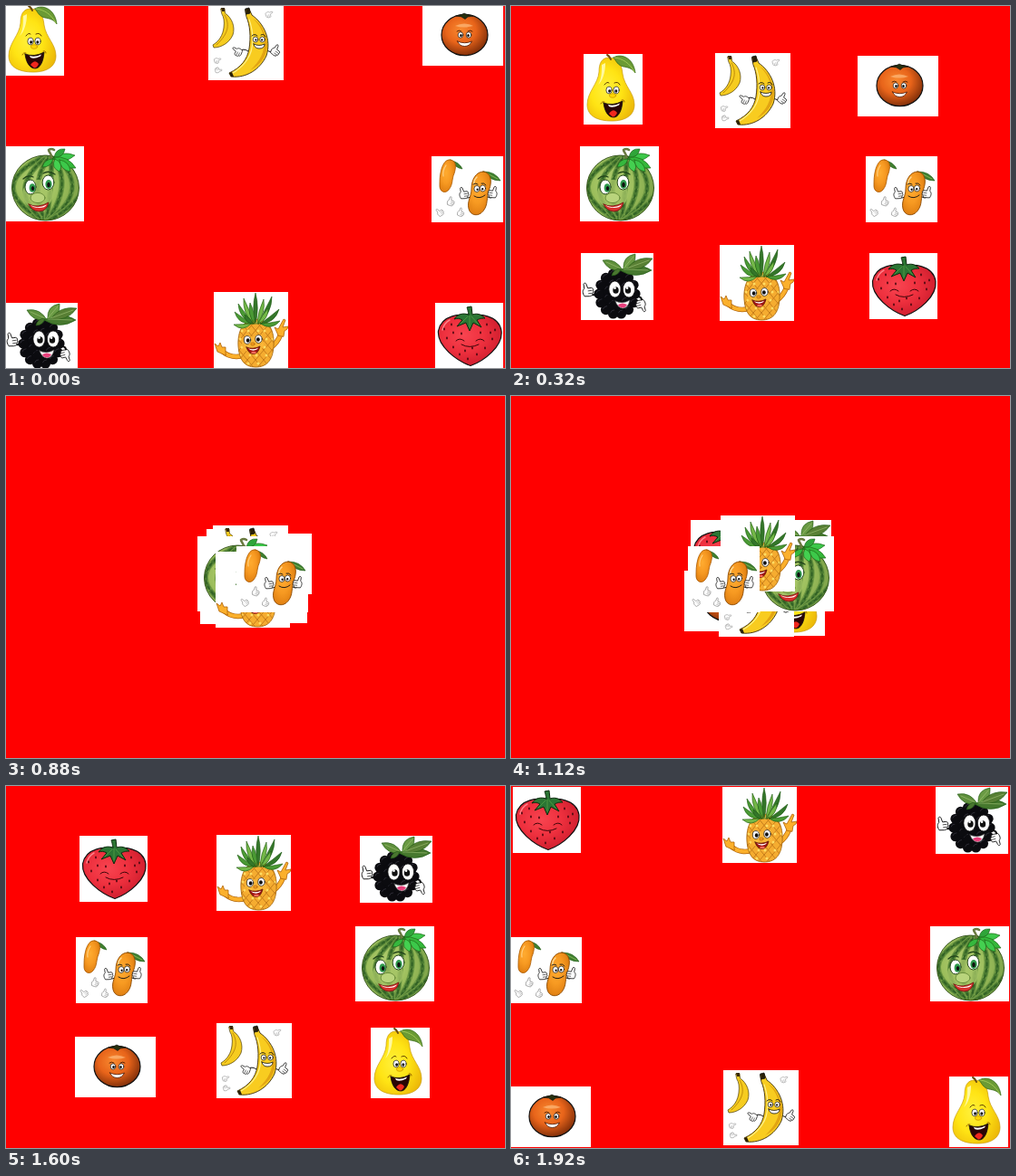
Write an HTML page that moves like this. It is 550 by 400 pixels and loops after 2000 ms.

```html
<!DOCTYPE html>
<html lang="en">
<head>
<meta charset="utf-8">
<title>Fruit cards</title>
<style>
  html, body { margin: 0; width: 100%; height: 100%; overflow: hidden; background: #f00; }
  svg { display: block; position: absolute; left: 0; top: 0; }
</style>
</head>
<body>
<svg id="stage" width="550" height="400" viewBox="0 0 550 400" stroke-linecap="round" stroke-linejoin="round"></svg>
<script>
const INK = '#111';

// Shape helpers, all returning SVG markup
const path = (d, fill = 'none', stroke = 'none', w = 1, more = '') =>
  `<path d="${d}" fill="${fill}" stroke="${stroke}" stroke-width="${w}" ${more}/>`;
const oval = (x, y, rx, ry, fill, stroke = 'none', w = 1, more = '') =>
  `<ellipse cx="${x}" cy="${y}" rx="${rx}" ry="${ry}" fill="${fill}" stroke="${stroke}" stroke-width="${w}" ${more}/>`;
const line = (d, stroke = INK, w = 1) => path(d, 'none', stroke, w);
const range = (n, fn) => Array.from({ length: n }, (_, i) => fn(i)).join('');

// Pointed leaf from base to tip; bend pushes its middle sideways
function leaf(x1, y1, x2, y2, w, fill, bend = 0, stroke = '#1d5a12') {
  const dx = x2 - x1, dy = y2 - y1, len = Math.hypot(dx, dy);
  const side = k => `${x1 + dx / 2 - dy / len * k},${y1 + dy / 2 + dx / len * k}`;
  return path(`M${x1},${y1}Q${side(bend + w)} ${x2},${y2}Q${side(bend - w)} ${x1},${y1}Z`, fill, stroke, .6);
}
const eye = (x, y, rx, ry, px, py, r) =>
  oval(x, y, rx, ry, '#fff', INK, .7) + oval(x + px, y + py, r, r * 1.2, INK);
const glove = (x, y, s = 1, flip = 1, tilt = 0, ink = INK) =>
  `<g transform="translate(${x} ${y}) rotate(${tilt}) scale(${s * flip} ${s})">` +
  path('M-4,6C-6,2 -5,-1 -3,-2L-3,-7C-2,-9 0,-8 0,-6L1,-2L5,-2C7,-1 7,1 6,1C7,2 7,4 5,4C6,6 4,7 2,7Z', '#fff', ink, .9) +
  line('M1,1L5,1M1,4L4,4', ink, .7) + '</g>';
const radial = (id, cx, cy, ...stops) =>
  `<radialGradient id="${id}" cx="${cx}" cy="${cy}" r=".65">` +
  stops.map((c, i) => `<stop offset="${i / (stops.length - 1)}" stop-color="${c}"/>`).join('') + '</radialGradient>';

const pineBody = 'M46,30C62,30 67,44 66,60C65,76 58,83 46,83C33,83 28,74 27,60C26,44 32,30 46,30Z';
const defs = '<defs>' +
  radial('gPear', .4, .5, '#fff03a', '#ffe414', '#ecb808') +
  radial('gOrange', .42, .38, '#f98a30', '#e8641a', '#7c2c08') +
  radial('gMango', .4, .4, '#ffab30', '#f79a22', '#dd7c10') +
  radial('gBerry', .4, .4, '#f84450', '#ee303e', '#cc1c2c') +
  radial('gMelon', .4, .45, '#b6d074', '#9cbe5c', '#7a9f46') +
  '<clipPath id="cMelon"><ellipse cx="44.5" cy="46" rx="37" ry="36"/></clipPath>' +
  `<clipPath id="cPine"><path d="${pineBody}"/></clipPath></defs>`;

function pear() {
  return path('M28,4C20,4 17,10 17,20C16,33 4,42 4,56C4,69 16,74 31,74C46,74 56,68 56,56C56,43 45,36 43,22C42,10 37,4 28,4Z', 'url(#gPear)', '#c89a10', .7) +
    path('M20,12C20,20 20,28 16,34C21,30 24,20 24,10Z', '#fff9a0') +
    line('M30,6C29,3 28,2 26,1', '#6b4a12', 2) +
    path('M33,4C40,-1 55,3 57,21C53,15 48,15 44,14C38,13 36,8 33,4Z', '#6a9a34', '#2f6412', .7) +
    line('M34,4C43,5 51,10 56,20', '#b4d860', .7) +
    line('M23,34Q26,30 28,32M34,32Q38,30 40,34', '#5a3a00', 1) +
    eye(28, 40, 3.1, 3.9, .6, 1, 1.5) + eye(36, 40, 3.1, 3.9, -.2, 1, 1.5) +
    oval(32, 46, 3.6, 2.3, '#ffd800', '#c89000', .7) +
    path('M22,54Q32,58 43,52C42,64 38,70 33,70C27,70 23,63 22,54Z', '#2a0505', INK, .8) +
    path('M28,66Q33,59 37,65Q35,69.5 32,69.5Z', '#f0281e') +
    path('M27,56Q33,58 40,54.5L39,56.5Q32,60 28,58Z', '#fff') +
    line('M19,55Q20,52 23,53M42,51Q45,50 45,53', '#a06a00');
}

function banana() {
  const small = 'M14,4L18,4L18.5,9C26,14 30,24 27,33C23,42 14,47 6,47L5,44C12,40 16,33 17,25C18,18 17,13 15,10Z';
  const big = 'M41,5L45,4L48,11C61,20 70,38 64,56C57,71 42,81 25,79L23,75C36,69 43,60 45,48C47,35 46,22 42,13Z';
  return path(small, '#f6cc20', '#4a3a08', .7) +
    line('M18,11C23,20 24,30 9,44', '#b88408', .9) +
    path('M14,3L18,3L18,7L15,7Z', '#3a2a08') +
    line('M44,51Q39,47 34,51M64,49Q69,54 71,50') +
    path(big, '#f8cc20', '#3a2c08', .9) +
    path('M49,15C64,28 69,52 46,72C58,66 65,56 65,42C63,30 58,20 49,15Z', '#e2a412') +
    line('M45,16C50,30 51,48 43,60C38,68 32,72 27,75', '#fff08a', 1.2) +
    path('M41,4L45,3L46,9L42,10Z', '#2a2008', INK, .8) +
    path('M23,75L25,79L28,79L26,74Z', '#2a2008') +
    eye(52, 38, 2.8, 3, .4, .4, 1) + eye(59.5, 38, 2.8, 3, -.4, .4, 1) +
    line('M48,34Q51,31 54,34M58,33Q61,31 63,35', INK, .9) +
    path('M50,43Q56,46 62,43Q62,48 56,48Q51,48 50,43Z', '#fff', INK, .8) +
    glove(32, 51, .75, -1, -65) + glove(74, 50, .8, 1, 35) +
    glove(67, 10, .55, 1, 70, '#888') + glove(10, 61, .5, 1, 80, '#777') + glove(11, 72, .5, -1, 75, '#777');
}

function orange() {
  return oval(46.5, 33, 25.5, 22.7, 'url(#gOrange)', INK, 1.2) +
    path('M36,23Q46,18 56,23Q46,26 36,23Z', '#ffc48a', 'none', 1, 'opacity=".6"') +
    path('M37,12L43,10.5L46,9L49,10.5L56,12L50,13L47,15.5L43,13Z', '#26300f', INK, .6) +
    eye(42, 33, 2.8, 3.2, .5, .5, 1.3) + eye(51, 33, 2.8, 3.2, -.5, .5, 1.3) +
    line('M38,29Q40,27 43,29M50,29Q53,27 55,29', '#4a1a00', .9) +
    path('M38.5,40Q46.5,43.5 54.5,40Q52,45.5 46.5,45.5Q41,45.5 38.5,40Z', '#fff', '#4a1500', .8);
}

function melon() {
  const bend = [-30, -4, 24, 52, 77, 100, 122];
  const stripes = bend.map((x, i) => {
    const d = `M51,8Q${x},${42 + i % 2 * 5} 45,84`;
    return line(d, '#6f9a44', 6) +
      path(d, 'none', '#487830', 4, 'stroke-dasharray="5 5 8 4"') +
      path(d, 'none', '#2f5f24', 1.6, 'stroke-dasharray="3 4"');
  }).join('');
  return oval(44.5, 46, 37, 36, 'url(#gMelon)') +
    `<g clip-path="url(#cMelon)">${stripes}${oval(36, 53, 17, 16, '#a5c566', 'none', 1, 'opacity=".8"')}</g>` +
    oval(44.5, 46, 37, 36, 'none', '#3a5a22', 1) +
    line('M51,13C52,8 48,7 48,4Q51,2 54,4', '#6a7a40', 2.6) +
    leaf(52, 14, 77, 10, 8, '#3cc84a') + leaf(53, 14, 41, 23, 6, '#36b83e') +
    leaf(53, 12, 78, 24, 9, '#34b83a') + leaf(55, 14, 60, 28, 8, '#44d050') +
    leaf(54, 12, 66, 3, 7, '#2fa53a') + leaf(60, 15, 72, 28, 7, '#3cc84a') +
    oval(28, 45, 6, 8, '#fff', '#23451a') + oval(30, 46, 3.4, 4.8, '#2f9a4c') + oval(30.5, 46.5, 1.7, 2.6, INK) +
    oval(47.5, 40, 6.4, 8, '#fff', '#23451a') + oval(48, 42, 3.6, 5, '#2f9a4c') + oval(48, 42.5, 1.8, 2.7, INK) +
    line('M20,36Q25,31 31,34M42,30Q48,26 55,31', '#23451a', 1.3) +
    oval(36, 57, 8, 5.6, '#b9d47c', '#5c8030', .8) +
    path('M26,64Q36,69 48,62Q46,72 37,72Q29,71 26,64Z', '#d8302c', '#701010', .8) +
    path('M28,65Q36,69.5 46,64.5Q44,68 37,68Q31,68 28,65Z', '#fff');
}

function mango() {
  return leaf(22, 5, 34, 14, 4, '#3f7f30') +
    path('M21,4C28,5 27,13 25,19C22,26 24,31 19,37C15,42 9,39 9,33C9,27 9,21 11,14C13,8 16,3 21,4Z', 'url(#gMango)', '#a85800', .8) +
    line('M16,10Q12,16 13,22', '#ffd080', 1.2) +
    leaf(58, 17, 76, 27, 6, '#3f7f30') + line('M59,18L73,25', '#9ccc60', .7) +
    line('M43,45Q37,48 35,43M62,45Q67,48 68,43') +
    path('M57,17C66,18 67,28 63.5,37C60,46 63,53 57,60.5C52,67 43,66 41,58C39,49 44,45 44,36C44,26 49,17 57,17Z', 'url(#gMango)', '#8a4800', .9) +
    line('M50,23Q46,27 47,31', '#ffd690', 1.5) +
    eye(50, 36, 3.1, 3.5, .6, .8, 1.1) + eye(56.5, 35.5, 3.1, 3.5, -.3, .8, 1.1) +
    line('M46,31Q48,29 51,31M55,30Q58,29 60,32', INK, .9) +
    line('M47,44Q53,48 59,43', INK, .9) +
    glove(35, 41, .85, 1, -8) + glove(68, 40, .85, -1, 8) +
    glove(21, 50, .65, 1, 15, '#777') + glove(9, 62, .6, 1, -35, '#777') + glove(32, 62, .6, 1, 20, '#777');
}

function blackberry() {
  const black = '#0b0b0f';
  // Rings of drupes around a dark core
  const ring = (n, rx, ry) => range(n, i => {
    const a = i / n * 2 * Math.PI, x = 40 + rx * Math.cos(a), y = 45 + ry * Math.sin(a);
    return oval(x, y, 5.6, 5.6, black) + line(`M${x - 3},${y - 1}q1,-3 4,-3`, '#3c3a46', .7);
  });
  return line('M19,45Q12,48 8,44M62,48Q68,48 67,54', INK, 2) +
    oval(40, 45, 21, 24, black) + ring(14, 20, 22.5) + ring(9, 11, 13) +
    leaf(46, 19, 24, 8, 9, '#5f8f3c') + leaf(43, 19, 78, 19, 11, '#46782e') +
    leaf(47, 18, 60, 1, 10, '#6a9a44') + leaf(50, 18, 79, 6, 10, '#587f34') +
    leaf(44, 17, 34, 25, 5, '#4a7630') +
    line('M47,17L58,4M47,18L74,19M50,17L75,8M44,17L28,10', '#a4c47a', .6) +
    eye(37.5, 40, 6.6, 9, 1, 1, 3.2) + eye(53, 40, 6.6, 9, -1, 1, 3.2) +
    oval(37.5, 38.5, 1.3, 1.5, '#fff') + oval(51, 38.5, 1.3, 1.5, '#fff') +
    path('M38,53Q46,57 54,52Q52,61 46,61Q40,60 38,53Z', '#fff', '#555', .7) +
    path('M41,57Q46,54 51,57Q49,60.5 46,60.5Q42,60 41,57Z', '#e8407c') +
    glove(7, 41, 1, 1, -8) + glove(67, 58, .9, 1, 165);
}

function pineapple() {
  const tips = [[23, 22], [22, 36], [72, 19], [73, 32], [33, 7], [64, 5], [27, 13], [55, 8], [46, 1], [40, 12], [60, 18], [34, 25]];
  const greens = ['#4a9a34', '#74b848', '#34762a'];
  const grid = range(13, i => line(`M${-20 + i * 9},28l48,58M${112 - i * 9},28l-48,58`, '#c27a1a', .9));
  const arm = d => line(d, '#b0640a', 5.6) + line(d, '#fbb02c', 4.2);
  return arm('M30,71Q18,73 10,66') + arm('M62,62Q70,57 74,46') +
    path('M13,70L4,66L1,57L5,60L7,56L9,61L13,61L13,67Z', '#fbb02c', '#b0640a', .8) +
    path('M71,48L67,39L71,41L77,30L79,31L76,39L82,38L81,41L78,43L77,49Z', '#fbb02c', '#b0640a', .8) +
    `<g clip-path="url(#cPine)"><path d="M20,25h54v60h-54z" fill="#f5ac30"/>${grid}` +
    range(28, i => oval(29 + i % 5 * 9 + (i % 2) * 2, 34 + Math.floor(i / 5) * 9, 1.5, 1.5, '#ffdc62')) + '</g>' +
    path(pineBody, 'none', '#a86a14', .9) +
    tips.map(([x, y], i) => leaf(46 + (x - 46) * .2, 35, x, y, 4.5, greens[i % 3], (x - 46) * .2)).join('') +
    oval(43, 58, 12, 9, '#fcb93a', 'none', 1, 'opacity=".8"') +
    eye(37, 53, 3.7, 4.4, .7, .5, 1.9) + eye(49.5, 52, 3.7, 4.4, -.6, .5, 1.9) +
    oval(43, 57.5, 2.2, 1.6, '#f39a1c', '#a8600a', .6) +
    path('M36,61Q43,64 51,60Q49,68.5 43.5,68.5Q38,68 36,61Z', '#a01414', '#5a1a08', .8) +
    path('M38,62.3Q43,64.5 49,61.7Q48,64 43.5,64.8Q39.5,64.5 38,62.3Z', '#fff') +
    oval(44, 67, 2.8, 1.2, '#ff6a5a');
}

function strawberry() {
  const seeds = [[10, 29], [18, 24], [13, 39], [20, 49], [27, 57], [36, 62], [46, 57], [55, 50], [63, 40], [66, 30], [57, 24], [61, 33], [20, 33], [33, 53], [50, 33], [29, 34], [41, 50]];
  return path('M38,16C29,11 7,13 3.5,31C2,48 24,64 39,69.5C54,64 75,48 73,31C70,13 47,11 38,16Z', 'url(#gBerry)', INK, 1.2) +
    line('M8,30Q10,22 16,19', '#ff8088', 1.5) +
    seeds.map(([x, y]) => oval(x, y, .9, 1.4, '#4a0810')).join('') +
    path('M37,13C36,9 36,7 35,5L40,4L41,13C47,11 51,13 55,17C50,17 48,18 46,19L51,27L42,22L38,31L34,22L24,26L30,19C27,17 24,17 21,18C25,12 31,11 37,13Z', '#2b7634', '#0b2a0c', 1) +
    line('M38,14L38,27M40,15L48,24M36,15L28,23', '#5aa848', .7) +
    line('M23,42Q27,38 32,42M45,42Q50,38 54,42', '#3a0508', 1) +
    line('M29,46Q38,51 48,46', '#3a0508', 1);
}

// Bottom to top: drawing, card size, start point, end point
const cards = [
  [pear, 65, 78, -1, -1, 483, 321],
  [orange, 89, 67, 459, -1, -1, 332],
  [strawberry, 75, 73, 473, 327.5, 2, 1],
  [blackberry, 80, 74, -1, 327.5, 468, 1],
  [banana, 83, 83, 223, -1, 234, 314],
  [melon, 87, 83, -1, 155, 462, 155],
  [pineapple, 82, 84, 229, 316, 233, 1],
  [mango, 79, 73, 469, 165.5, -1, 167]
];

const stage = document.getElementById('stage');
stage.innerHTML = defs + cards.map(([draw, w, h]) =>
  `<g class="card"><rect width="${w}" height="${h}" fill="#fff"/>${draw()}</g>`).join('');
const groups = stage.querySelectorAll('.card');

const LOOP = 2000, HOLD = 80, LAST = LOOP / HOLD - 1;

function render(now) {
  const p = Math.floor(now % LOOP / HOLD) / LAST;
  const between = (a, b) => Math.round(a + (b - a) * p);
  cards.forEach(([, , , x0, y0, x1, y1], i) => {
    groups[i].setAttribute('transform', `translate(${between(x0, x1)} ${between(y0, y1)})`);
  });
}

const start = performance.now();
function tick() {
  render(performance.now() - start);
  requestAnimationFrame(tick);
}
tick();
</script>
</body>
</html>
```
